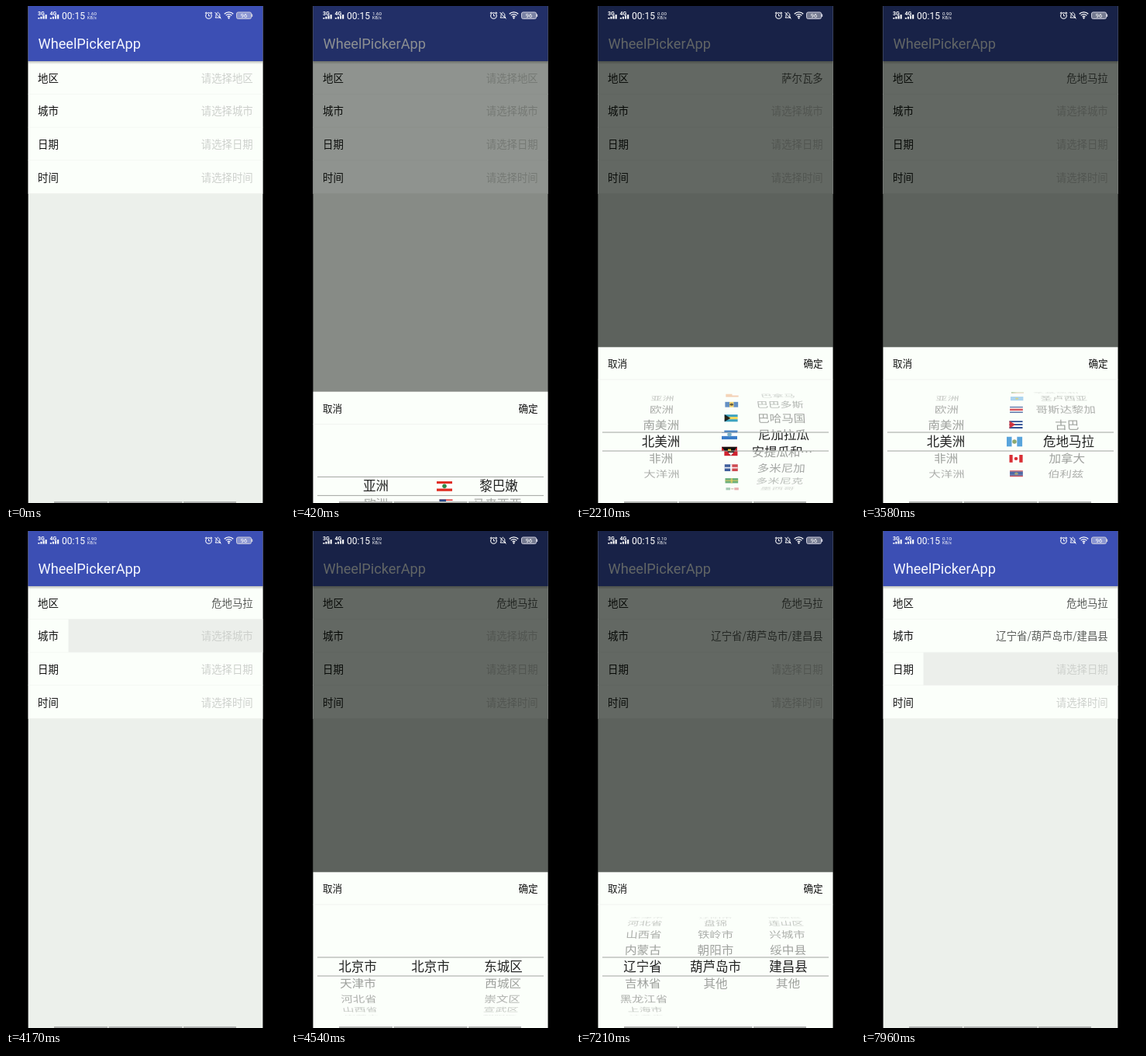
Recreate the animation shown at these times as an HTML page with a canvas. Size 360 by 640 pixels, loop 8000 ms.

```html
<!DOCTYPE html>
<html lang="zh-CN">
<head>
<meta charset="utf-8">
<title>WheelPickerApp</title>
<style>
html, body { margin: 0; width: 100%; height: 100%; overflow: hidden; background: #000; }
canvas { display: block; width: 360px; height: 640px; }
</style>
</head>
<body>
<canvas id="stage"></canvas>
<script>
const LOOP = 8000, MID = 561, RADIUS = 64, STEP = Math.PI / 9;
const LEFT = 28.4, WIDTH = 303.2, PANEL = 439.3, BAND_TOP = 549, BAND_END = 573;
const CJK = '"Noto Sans CJK SC", "Noto Sans CJK", sans-serif';
const LATIN = 'Roboto, sans-serif';
const canvas = document.getElementById('stage');
const ratio = window.devicePixelRatio || 1;
canvas.width = 360 * ratio;
canvas.height = 640 * ratio;
const g = canvas.getContext('2d');

const words = s => s.split(' ');
const CONTINENTS = words('亚洲 欧洲 南美洲 北美洲 非洲 大洋洲');
const PROVINCES = words('北京市 天津市 河北省 山西省 内蒙古 辽宁省 吉林省 黑龙江省 上海市 江苏省 浙江省');
const LIAONING = words('沈阳市 大连市 鞍山市 抚顺市 本溪市 丹东市 锦州市 营口市 阜新市 辽阳市 盘锦 铁岭市 朝阳市 葫芦岛市 其他');
const BEIJING = words('东城区 西城区 崇文区 宣武区 朝阳区 丰台区');
const SHENYANG = words('沈河区 皇姑区 和平区 大东区 铁西区 苏家屯区');
const HULUDAO = words('龙港区 南票区 连山区 兴城市 绥中县 建昌县 其他');

// name, stripe direction, stripe colours, then emblem and its colour
const flags = s => s.trim().split('\n').map(row => {
  const [name, dir, colours, mark, ink] = row.trim().split(' ');
  return { name, dir, colours: colours.split(','), mark, ink };
});
const ASIA = flags(`
  黎巴嫩 h #e02b20,#fff,#fff,#e02b20 dot #2d8a48
  马来西亚 h #d33,#fff,#d33,#fff,#d33,#fff canton #234a8c
  马尔代夫 h #d3222f box #187a3c
  韩国 h #fff dot #c8434f
  阿曼 h #fff,#d33,#2a8a3e canton #d33`);
const NORTH_AMERICA = flags(`
  萨尔瓦多 h #2a5cab,#fff,#2a5cab dot #6a9a50
  巴拿马 h #fff,#e8935a canton #e8a060
  巴巴多斯 v #2a66b0,#f0c33c,#2a66b0 dot #333
  巴哈马国 h #2a9ab8,#f2d34a,#2a9ab8 tri #111
  尼加拉瓜 h #3a7cc8,#fff,#3a7cc8 dot #7ab0c8
  安提瓜和⋯ h #d0202c vee #111
  多米尼加 v #25488f,#c8303a cross #fff
  多米尼克 h #2a8a3e cross #f0d060
  墨西哥 v #207a4a,#fff,#c8303a dot #9a7040
  牙买加 h #2a8a3e,#111 cross #f0c830
  洪都拉斯 h #3a7cc8,#fff,#3a7cc8 dot #3a7cc8
  海地 h #25488f,#c8303a box #fff
  格林纳达 h #c8303a,#f0c830,#2a8a3e dot #c8303a
  圣文森特⋯ v #25488f,#f0d040,#2a8a3e dot #2a8a3e
  圣基茨和⋯ h #2a8a3e,#f0c830,#c8303a tri #2a8a3e
  圣卢西亚 h #72b4e8 dot #f0d040
  哥斯达黎加 h #25488f,#fff,#d0303a,#d0303a,#fff,#25488f
  古巴 h #25488f,#fff,#25488f,#fff,#25488f tri #d0303a
  危地马拉 v #58a4dc,#fff,#58a4dc dot #8aa870
  加拿大 v #d8252c,#fff,#fff,#d8252c dot #d8252c
  伯利兹 h #c8303a,#1f3f8f,#1f3f8f,#1f3f8f,#1f3f8f,#c8303a dot #b8b070`);

const easing = { lin: p => p, out: p => 1 - (1 - p) ** 2, soft: p => p * p * (3 - 2 * p) };

// rows of [time, value, easing into this row]
function track(t, rows) {
  if (t <= rows[0][0]) return rows[0][1];
  for (let i = 1; i < rows.length; i++) {
    const [t0, v0] = rows[i - 1], [t1, v1, ease = 'lin'] = rows[i];
    if (t < t1) return v0 + (v1 - v0) * easing[ease]((t - t0) / (t1 - t0));
  }
  return rows[rows.length - 1][1];
}
const latest = (t, rows) => rows.filter(r => r[0] <= t).pop()[1];

const OPEN = [[300, 0], [560, 1, 'out'], [3730, 1], [3960, 0, 'soft'], [4230, 0], [4480, 1, 'out'], [7540, 1], [7770, 0, 'soft']];
const CONTINENT = [[850, 0], [1000, 1.1], [1420, 3, 'out']];
const COUNTRY = [[1800, 0], [2210, 4.4], [2800, 13], [3250, 18, 'out']];
const PROVINCE = [[4720, 0], [5280, 5, 'soft']];
const CITY = [[5500, 0], [5960, 12.5, 'out'], [6200, 13, 'out']];
const DISTRICT = [[6480, 0], [7060, 5, 'soft']];
const SPEED = [[0, '1.60'], [880, '0.20'], [1800, '0.00'], [2900, '0.90'], [5040, '0.40'], [7000, '0.10']];
const REGION_VALUE = [[0, ''], [1560, '萨尔瓦多'], [3320, '危地马拉']];
const CITY_VALUE = [[0, ''], [5360, '辽宁省/沈阳市/沈河区'], [6260, '辽宁省/葫芦岛市/龙港区'], [7120, '辽宁省/葫芦岛市/建昌县']];
const PRESSES = [[60, 330, 0], [4010, 4260, 1], [7840, 8000, 2]];

function rect(x, y, w, h, colour) {
  g.fillStyle = colour;
  g.fillRect(x, y, w, h);
}
const fullWidth = (y, h, colour) => rect(LEFT, y, WIDTH, h, colour);
function text(s, x, y, size, colour, align = 'left', family = CJK, weight = 400) {
  g.font = `${weight} ${size}px ${family}`;
  g.textAlign = align;
  g.fillStyle = colour;
  g.fillText(s, x, y + size * 0.37);
}
function line(colour, width, ...points) {
  g.strokeStyle = colour;
  g.lineWidth = width;
  g.beginPath();
  points.forEach(([x, y]) => g.lineTo(x, y));
  g.stroke();
}
function arc(x, y, r, from = 0, to = 7) {
  g.beginPath();
  g.arc(x, y, r, from, to);
}
function fillPath(...points) {
  g.beginPath();
  points.forEach(([x, y]) => g.lineTo(x, y));
  g.fill();
}
function clipped(y, h, draw) {
  g.save();
  g.beginPath();
  g.rect(LEFT, y, WIDTH, h);
  g.clip();
  draw();
  g.restore();
}

function drawStatus(t) {
  const white = '#fff';
  ['3G', '4G'].forEach((name, i) => {
    const x = 41 + i * 15.5;
    text(name, x, 9, 7, white, 'left', LATIN, 700);
    for (let b = 0; b < 4; b++) rect(x + 0.3 + b * 3.1, 15 - b * 1.3, 2.1, 1.6 + b * 1.3, white);
  });
  text('00:15', 72, 12.6, 12, white, 'left', LATIN);
  text(latest(t, SPEED), 105, 9.4, 6.2, white, 'left', LATIN);
  text('KB/s', 105, 15.2, 5.4, white, 'left', LATIN);

  g.strokeStyle = white;
  g.lineWidth = 1.1;
  arc(261.5, 12.5, 3.8);
  g.stroke();
  line(white, 1, [261.5, 10.2], [261.5, 12.8], [263.3, 12.8]);
  line(white, 1.1, [257, 9.5], [259, 7.8]);
  line(white, 1.1, [266, 9.5], [264, 7.8]);
  line(white, 1, [270, 15], [271, 13.5], [271, 10.5], [273.4, 8.2], [275.8, 10.5], [275.8, 13.5], [277, 15], [270, 15]);
  line(white, 1, [269.5, 8], [277.5, 16.5]);
  [2.6, 5.4, 8.2].forEach(r => {
    g.lineWidth = 1.3;
    arc(287.5, 16, r, -2.35, -0.79);
    g.stroke();
  });
  g.fillStyle = white;
  arc(287.5, 15.6, 1.1);
  g.fill();

  g.beginPath();
  g.roundRect(297.5, 8, 19, 8.4, 2);
  g.fillStyle = 'rgba(255,255,255,.4)';
  g.fill();
  g.lineWidth = 1;
  g.strokeStyle = '#ccd';
  g.stroke();
  rect(317, 10.5, 1.2, 3.4, '#ccd');
  text('96', 307, 12.3, 7.5, white, 'center', LATIN);
}

function drawForm(t) {
  fullWidth(0, 640, '#ecf0eb');
  fullWidth(71, 170.5, '#fbfffa');
  fullWidth(0, 71, '#3c4fb4');
  const shade = g.createLinearGradient(0, 71, 0, 75);
  shade.addColorStop(0, 'rgba(0,0,0,.25)');
  shade.addColorStop(1, 'rgba(0,0,0,0)');
  fullWidth(71, 4, shade);
  text('WheelPickerApp', 41.5, 47.8, 18.2, '#f6f8ff', 'left', LATIN);

  const pressed = PRESSES.find(([from, to]) => t >= from && t < to);
  if (pressed) {
    g.globalAlpha = Math.min(1, (t - pressed[0]) / 90);
    rect(80.5, 71 + pressed[2] * 42.6, LEFT + WIDTH - 80.5, 42.6, '#ecefeb');
    g.globalAlpha = 1;
  }
  const values = [latest(t, REGION_VALUE), latest(t, CITY_VALUE), '', ''];
  ['地区', '城市', '日期', '时间'].forEach((label, i) => {
    const y = 92.8 + i * 42.6;
    fullWidth(113.2 + i * 42.6, 0.6, '#f0f3ef');
    text(label, 41, y, 13.4, '#111');
    text(values[i] || '请选择' + label, 318.7, y, 13.4, values[i] ? '#585a58' : '#cdd0cc', 'right');
  });
}

function drawFlag({ dir, colours, mark, ink }, centre) {
  const w = centre ? 20 : 18, h = centre ? 12.5 : 11, n = colours.length;
  g.save();
  g.translate(-w / 2, -h / 2);
  colours.forEach((c, i) => dir === 'h'
    ? rect(0, i * h / n, w, h / n + 0.1, c)
    : rect(i * w / n, 0, w / n + 0.1, h, c));
  g.fillStyle = ink;
  if (mark === 'dot') { arc(w / 2, h / 2, h * 0.22); g.fill(); }
  if (mark === 'canton') g.fillRect(0, 0, w / 2, h / 2);
  if (mark === 'box') g.fillRect(w * 0.25, h * 0.27, w * 0.5, h * 0.46);
  if (mark === 'cross') {
    g.fillRect(w * 0.43, 0, w * 0.14, h);
    g.fillRect(0, h * 0.4, w, h * 0.2);
  }
  if (mark === 'tri') fillPath([0, 0], [w * 0.45, h / 2], [0, h]);
  if (mark === 'vee') {
    fillPath([0, 0], [w, 0], [w / 2, h]);
    g.fillStyle = '#fff';
    fillPath([w * 0.3, h * 0.6], [w * 0.7, h * 0.6], [w / 2, h]);
    rect(w * 0.4, h * 0.22, w * 0.2, h * 0.22, '#f0c830');
  }
  g.restore();
}

// pivot: point the column shrinks towards; drift: sideways lean of the far edge
function drawWheel(items, pos, x, pivot, drift, paint) {
  const layer = centre => items.forEach((item, i) => {
    const angle = (i - pos) * STEP;
    if (Math.abs(angle) > 1.5) return;
    const cos = Math.cos(angle), sin = Math.sin(angle);
    const scale = centre ? 1 : 0.88 + 0.07 * cos;
    g.save();
    g.globalAlpha = centre ? 1 : cos ** 0.8;
    g.transform(scale, 0, drift * sin / RADIUS, scale * Math.max(cos, 0.12),
      pivot + (x - pivot) * scale + drift * (1 - cos), MID + RADIUS * sin);
    paint(item, centre);
    g.restore();
  });
  clipped(497, BAND_TOP - 497, () => layer(false));
  clipped(BAND_END, 624 - BAND_END, () => layer(false));
  clipped(BAND_TOP, BAND_END - BAND_TOP, () => layer(true));
}
const paintText = (s, centre) => text(s, 0, 0, 16.5, centre ? '#222' : '#999b98', 'center');

function drawDialog(t) {
  fullWidth(PANEL, 640 - PANEL, '#fbfffa');
  fullWidth(480.6, 0.8, '#eef1ed');
  text('取消', 41, 460.5, 12.6, '#111');
  text('确定', 318.7, 460.5, 12.6, '#111', 'right');
  if (t < 4100) {
    const inAmerica = t >= 1520;
    const countries = inAmerica ? NORTH_AMERICA : ASIA;
    const pos = inAmerica ? track(t, COUNTRY) : 0;
    drawWheel(CONTINENTS, track(t, CONTINENT), 109.5, 109.5, 4, paintText);
    drawWheel(countries, pos, 198, 235, 0, drawFlag);
    drawWheel(countries, pos, 268, 235, -7, (c, centre) => paintText(c.name, centre));
  } else {
    const chosen = t >= 5330;
    const districts = !chosen ? BEIJING : t < 6230 ? SHENYANG : HULUDAO;
    drawWheel(PROVINCES, track(t, PROVINCE), 86, 86, 6, paintText);
    drawWheel(chosen ? LIAONING : ['北京市'], chosen ? track(t, CITY) : 0, 180, 180, 0, paintText);
    drawWheel(districts, track(t, DISTRICT), 274, 274, -6, paintText);
  }
  [BAND_TOP, BAND_END].forEach(y => rect(34, y - 0.5, 292, 1, '#a2a4a1'));
}

function draw(t) {
  g.setTransform(ratio, 0, 0, ratio, 0, 0);
  rect(0, 0, 360, 640, '#000');
  clipped(0, 640, () => {
    drawForm(t);
    const open = track(t, OPEN);
    if (open > 0) {
      fullWidth(0, 640, `rgba(0,5,0,${0.605 * open})`);
      g.translate(0, (640 - PANEL) * (1 - open));
      drawDialog(t);
    }
  });
  drawStatus(t);
  [[62, 69], [132.5, 95], [229, 68]].forEach(([x, w]) => rect(x, 638, w, 2, '#b0b2b0'));
}

const start = performance.now();
function frame() {
  draw((performance.now() - start) % LOOP);
  requestAnimationFrame(frame);
}
frame();
</script>
</body>
</html>
```
